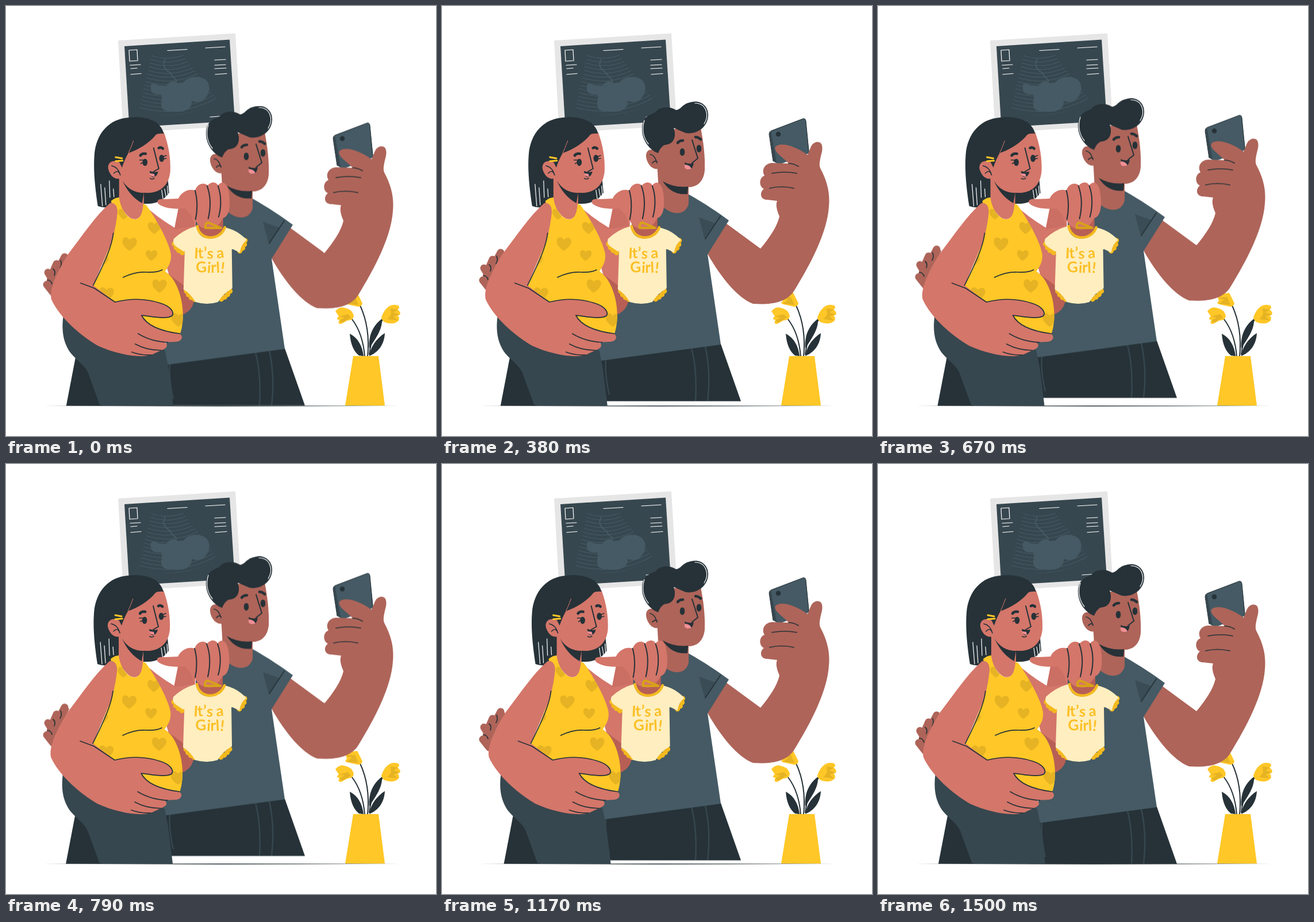
An HTML page without scripts for the animation above (1540 ms loop, 748 by 748 pixels).

```html
<!DOCTYPE html>
<html lang="en">
<head>
<meta charset="utf-8">
<title>It's a girl</title>
<style>
  html, body { margin: 0; width: 100%; height: 100%; overflow: hidden; background: #fff; }
  svg { display: block; width: 100vw; height: 100vh; }
  .man, .woman { animation: float 1.54s -.022s linear infinite; }
  .woman { animation-name: shake; }
  @keyframes float {
    0%, 97.4%, 100% { transform: translateY(0); }
    48.7% { transform: translateY(-14.9px); }
  }
  @keyframes shake {
    0%, 97.4%, 100% { transform: translateX(0); }
    9.7%, 87.7% { transform: translateX(-1.5px); }
    19.5%, 77.9% { transform: translateX(3px); }
    29.2%, 48.7%, 68.2% { transform: translateX(-6px); }
    39%, 58.4% { transform: translateX(6px); }
  }
  .dark { fill: #263238; }
  .slate { fill: #37474f; }
  .steel { fill: #455a64; }
  .sun { fill: #ffc727; }
  .gold { fill: #e5b323; }
  .his { fill: #ae6459; }
  .her { fill: #d4766a; }
  .her-shade { fill: #b75f55; }
  .tongue { fill: #f28f95; }
  .ink, .white { fill: none; stroke: #263238; stroke-width: 1.7; stroke-linecap: round; stroke-linejoin: round; }
  .white { stroke: #fff; stroke-width: 1.2; }
  .thick { stroke-width: 2; }
  .brow { stroke-width: 4.6; }
  .frill { fill: none; stroke: #f4b91e; stroke-width: 9; stroke-linecap: round; stroke-dasharray: 0 7; }
  text { font: 700 26px Lato, "Open Sans", sans-serif; fill: #fbc026; }
</style>
</head>
<body>
<svg viewBox="0 0 748 748">
  <defs>
    <radialGradient id="waves" gradientUnits="userSpaceOnUse" cx="280" cy="12" r="6.6" spreadMethod="repeat">
      <stop offset=".84" stop-color="#455a64" stop-opacity="0"/>
      <stop offset=".86" stop-color="#455a64"/>
    </radialGradient>
    <path id="heart" d="M0 13C-8 7-13 2-12-5-11-12-3-12 0-6 4-12 13-11 13-3 12 4 6 9 0 13Z"/>
    <path id="top" d="M183 339Q190 333 197 333C199 350 209 369 223 371 235 372 238 358 239 344L244 346C257 364 283 407 287 431 289 447 280 456 277 462 296 473 309 508 308 542Q307 562 302 573L235 550 190 516 152 488C164 462 184 412 190 385Z"/>
    <clipPath id="fabric"><use href="#top"/></clipPath>
  </defs>

  <g id="scan">
    <path fill="#e6e6e6" d="M195 60 399 47.500 408.500 208 204 221Z"/>
    <path class="slate" d="M206 70 389 58.500 398 200 214.500 211Z"/>
    <path fill="url(#waves)" d="M253 85Q280 97 306 82L369 165Q302 204 231 181Z"/>
    <path class="steel" d="M252 141C250 134 258 134 264 138L279 139C283 132 292 127 298 134L309 133C315 122 336 120 347 128 358 137 354 154 345 162 337 169 328 167 323 165 325 177 312 185 297 184 283 184 270 183 270 172 269 166 273 159 270 154Q250 155 252 141Z"/>
    <path fill="none" stroke="#455a64" stroke-width="2" d="M277 92C268 110 285 113 288 120S299 125 295 135"/>
    <path class="white" d="M214 77 228 76 229 95 215 96ZM216 103 234 102M217 109 228 108M217 119 235 117.500M281 77.500 315 75.500M347 73 381 71M363 94 382 93M363 103 382 102M363 109 383 108M364 119 384 117.500M355 193 377 191.500"/>
  </g>

  <path class="dark" d="M64 695.700 375 694.900 686 695.700 375 696.500Z"/>

  <g id="flowers">
    <path class="ink thick" d="M602 545Q621 570 624 610M616 521Q634 560 629 610M656 545Q636 570 632 606"/>
    <path class="dark" d="M598 570C613 578 620 592 622 609L614 608Q600 597 598 570ZM654 544C655 563 644 576 632 596 630 573 639 555 654 544ZM659 569C658 589 648 602 632 609 634 592 645 578 659 569Z"/>
    <path class="sun" d="M590 502Q604 500 611 499L620 517Q619 523 612 523L594 519Q587 517 593 513ZM573 531Q580 522 589 525 602 527 605 539 604 547 594 547L583 553Q576 553 580 546 572 545 579 540ZM653 542C657 529 666 518 678 520 686 521 685 526 681 528 688 533 687 538 681 538 687 544 683 550 674 552 663 553 654 550 653 542Z"/>
    <path class="gold" d="M590 507 607 506 613 520 593 518 602 511ZM579 540 595 536 600 542 585 551 580 547 589 542ZM669 526 682 528 674 533 685 537 674 540 682 547 664 545 670 536Z"/>
    <path class="sun" d="M604 609H648L659 695H590Z"/>
  </g>

  <g class="man">
    <path d="M102 437 90 460M88 449 78 472M73 464 83 480M71 485 82 499" fill="none" stroke="#ae6459" stroke-width="13" stroke-linecap="round"/>
    <path class="his" d="M104 433 110 440 80 501 69 489 73 466Z"/>
    <path class="ink" d="M95 443Q98 450 94 456M82 458Q87 462 84 469M72 477Q78 477 80 484"/>

    <path class="dark" d="M262 620 485 596 520 695.500H262Z"/>
    <path d="M434 603Q444 640 441 695M458 600Q468 645 462 695M285 624Q283 650 291 684" fill="none" stroke="#37474f" stroke-width="2.500"/>

    <g id="phone">
      <path class="slate" d="M569 229 573 225 583 282 576 278Z"/>
      <path class="steel" d="M572 225 628 204Q632 203 633 208L639 264 583 285Z"/>
      <path fill="none" stroke="#263238" d="M638 262 633 208Q632 203 628 204L573 225Q569 226 569 231L576 278"/>
      <circle class="dark" cx="585" cy="231" r="4.300"/>
    </g>

    <path class="his" d="M475 372 554 430C569 412 583 392 587 374Q579 356 583 347L566 345C553 345 552 332 560 326 551 322 551 307 561 303 555 294 561 282 574 281L603 282C594 271 576 262 580 253 587 245 611 249 636 267 641 257 641 248 650 245 659 243 663 249 661 261 657 277 655 286 659 292 671 315 675 334 673 357 670 405 637 463 614 501 601 525 570 528 541 526 514 516 484 478 463 441L445 415Z"/>
    <path class="ink" d="M574 299Q597 295 617 299M570 325Q590 320 612 325M603 282Q612 282 620 287"/>

    <path class="steel" d="M376 345 428 335C458 352 480 367 499 381L462 440 485 597 262 627 290 560 330 500V360Z"/>
    <path fill="#3a4c55" d="M447 376 475 386 457 413Z"/>
    <path class="ink" d="M484 374 458 413"/>

    <path class="his" d="M374 278 429 300V352C424 374 396 374 378 350Z"/>
    <path class="his" d="M376 258 404 222 450 220C455 245 458 271 457 294 455 315 442 324 427 323 402 322 384 310 376 295Z"/>
    <path class="dark" d="M384 313Q405 325 428 322L427 335Q400 338 384 313Z"/>
    <path class="his" d="M377 265C367 253 354 257 355 270 357 285 368 294 377 291Z"/>
    <path class="ink" d="M362 266Q370 267 374 281M366 281Q370 276 374 279"/>
    <path class="dark" d="M376 264C360 258 347 240 348 220 349 203 358 198 371 193 379 182 397 182 407 189 417 188 417 178 434 175 451 171 464 183 463 199 462 219 443 232 424 229L403 220C408 235 402 248 388 249Q380 253 376 264Z"/>
    <path class="white" d="M440 177C459 177 466 197 456 213M352 207C347 222 350 237 359 248"/>
    <path class="ink" d="M387 249Q406 247 404 227"/>
    <ellipse class="dark" cx="418" cy="262" rx="4.300" ry="6.600"/>
    <ellipse class="dark" cx="447" cy="256" rx="4.300" ry="6.600"/>
    <path class="ink brow" d="M410 246Q413 242 419 242M441 236Q446 236 450 240"/>
    <path class="ink thick" d="M435 241 445 273 435 281"/>
    <path class="dark" d="M422 280Q430 284 438 281 436 293 429 293 423 290 422 280Z"/>
    <path class="tongue" d="M422 284Q431 284 434 291 427 295 422 289Z"/>
  </g>

  <g class="woman">
    <path class="dark" d="M121 612 143 630 168 695.500H105Z"/>
    <path class="slate" d="M100 538C97 560 98 584 113 604 124 617 139 627 143 638L164 695.500H291L283 630 277 600 240 560Z"/>

    <path class="dark" d="M160 348C155 315 152 285 154 259 157 220 181 196 214 194 228 192 244 194 255 199 266 204 273 213 275 223L284 325Q270 345 244 344L195 345Q175 354 160 348Z"/>
    <path class="white" d="M165 310 168 348M172 316 174 346M180 304 181 333M187 318 188 332M271 320 274 340M276 318 279 334M281 313 282 329"/>

    <path class="her" d="M238 344Q262 367 294 386L301 350 330 340V500L286 476 262 390Z"/>
    <path class="her-shade" d="M277 462 312 488 328 507Q327 529 307 537Z"/>
    <path fill="#cb6e63" d="M300 352 318 350 328 382 310 386 293 388Z"/>

    <path class="her" d="M197 290 240 310V345C239 372 223 377 211 364 201 354 195 341 197 330Z"/>
    <path class="dark" d="M203 304Q216 325 240 325L237 343Q215 331 203 304Z"/>
    <path class="her" d="M196 264 245 225 275 220C283 242 287 265 286 287 284 314 266 326 244 325 222 325 202 306 198 292Z"/>
    <path class="her" d="M200 274C189 265 176 271 178 283 181 296 191 304 201 299Z"/>
    <path class="ink" d="M184 278Q195 280 199 294M188 291Q194 285 197 290"/>
    <path class="dark" d="M190 270 204 215 262 202 275 222Q265 221 261 224C249 239 232 249 213 256Q207 266 202 281L197 271Z"/>
    <path d="M222 234Q217 248 213 256" fill="none" stroke="#d4766a"/>
    <path d="M191 263 202 265M191 270 203 269" fill="none" stroke="#ffc727" stroke-width="3" stroke-linecap="round"/>
    <ellipse class="dark" cx="242" cy="272" rx="4.300" ry="6.200"/>
    <ellipse class="dark" cx="271" cy="265" rx="4.300" ry="6.200"/>
    <path class="ink" d="M239 268 233 268M239 272 235 274M274 262 279 260M275 266 279 265"/>
    <path class="ink brow" d="M234 260Q237 256 243 257M266 247Q270 245 273 248"/>
    <path class="ink thick" d="M257 247 266 283 257 288"/>
    <path class="dark" d="M250 287Q258 290 265 288 263 297 256 298 251 296 250 287Z"/>
    <path class="tongue" d="M250 291 258 292 259 297Q252 297 250 291Z"/>
    <path class="ink" d="M251 300Q254 302 258 300"/>

    <use href="#top" class="sun"/>
    <g class="gold" clip-path="url(#fabric)">
      <use href="#heart" x="215" y="413"/>
      <use href="#heart" x="267" y="486"/>
      <use href="#heart" x="175" y="500"/>
      <use href="#heart" x="300" y="545"/>
      <use href="#heart" transform="translate(253 433) scale(.8)"/>
      <use href="#heart" transform="translate(168 442) scale(.8)"/>
      <use href="#heart" transform="translate(205 361) scale(.8)"/>
      <use href="#heart" transform="translate(258 385) scale(.9)"/>
    </g>
    <path class="ink" d="M204 472Q225 462 244 463T272 459"/>

    <path class="her" d="M181 343C190 341 195 349 194 360 192 379 188 400 182 415L152 486 190 515C215 508 246 508 270 517 284 522 292 529 291 537 287 545 261 542 236 538 245 556 270 565 302 570 309 574 307 583 297 584L277 585Q286 593 270 599L253 607C233 613 193 606 160 591 130 573 94 543 79 510 75 491 91 459 108 432 135 397 154 367 181 343Z"/>
    <path class="ink" d="M187 395C184 423 165 459 152 486M130 482 154 491 190 515C218 508 245 509 269 517 286 522 294 533 289 539 280 545 256 541 236 538 245 556 271 566 303 570M230 570Q253 584 282 585M225 588Q245 599 270 599M219 602Q235 608 253 607"/>

    <g id="hand">
      <path class="her-shade" d="M332 370H378V395Q355 412 336 395Z"/>
      <path class="her" d="M265 344C261 337 267 335 277 336L300 335C305 324 318 317 329 321 333 309 344 306 351 312 358 304 367 307 369 312 377 302 386 309 388 325 391 345 390 365 378 369L372 378 362 388Q344 391 334 380L329 372 312 352Q279 355 265 344Z"/>
      <path class="ink thick" d="M329 321C334 338 333 358 330 371M350 313C357 332 356 353 352 370M369 313C376 332 374 354 370 367"/>
    </g>
    <path d="M347 385Q347 374 355 378L374 386 347 386" fill="none" stroke="#d8a218" stroke-width="4" stroke-linecap="round" stroke-linejoin="round"/>

    <g id="onesie">
      <path class="frill" d="M293 414Q297 425 307 429M416 408Q416 421 404 428M314 496Q319 508 333 512M390 496Q383 508 369 512"/>
      <path fill="#ffeebf" d="M331 383Q309 389 292 405 289 414 297 419L309 427Q312 424 311 432L309 493Q320 499 330 515 350 521 369 515 378 500 394 491L393 425Q392 421 399 425L407 429Q409 414 419 407 402 389 380 385 369 408 350 404 335 402 331 383Z"/>
      <path fill="none" stroke="#f4b91e" stroke-width="4.500" stroke-linecap="round" d="M333 383C337 409 373 409 381 385"/>
      <text x="327" y="439" rotate="3 -4 0 5 0 -5">It’s a</text>
      <text x="331" y="464" rotate="-4 3 0 -3 6">Girl!</text>
    </g>
  </g>
</svg>
</body>
</html>
```
